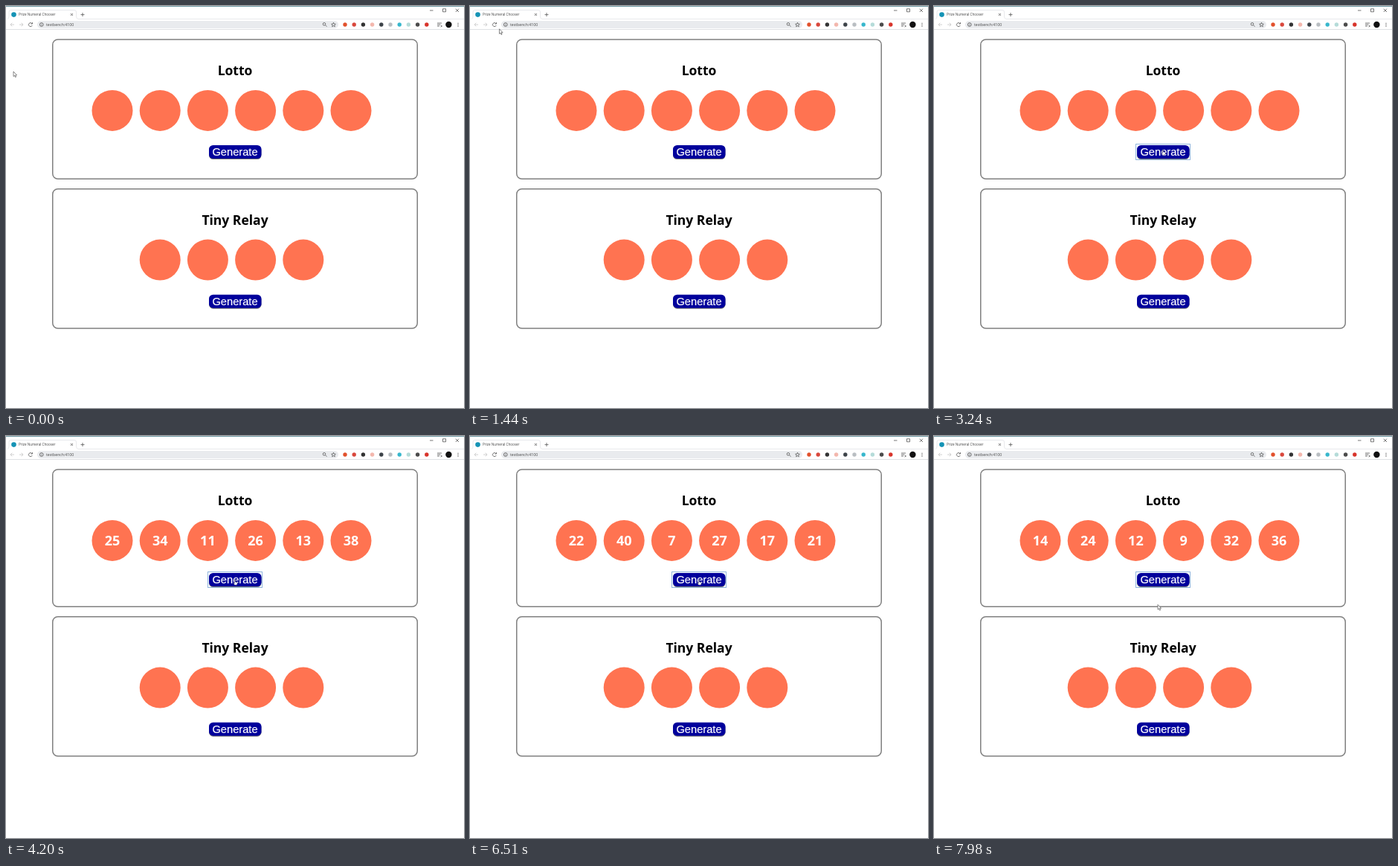
An HTML page that plays this animation: 616 px wide and 540 px high, repeating every 8000 ms.

```html
<!DOCTYPE html>
<html lang="en">
<head>
<meta charset="utf-8">
<title>Number generator</title>
<style>
  html, body { margin: 0; width: 100%; height: 100%; overflow: hidden; background: #fff; }
  svg { display: block; }
  text { font-family: "Open Sans", "Noto Sans", sans-serif; }
  .title { font-weight: 700; font-size: 17.5px; text-anchor: middle; }
  .number { font-weight: 700; font-size: 18px; text-anchor: middle; fill: #fff; }
  .label { font: 14.7px "Liberation Sans", Arial, sans-serif; text-anchor: middle;
           fill: #fff; stroke: #fff; stroke-width: .2; }
  .tiny { font-size: 4.6px; fill: #444; }
  .panel { fill: none; stroke: #808080; stroke-width: 1.5; }
  .ball { fill: #ff7351; }
  .button { fill: #00009c; filter: drop-shadow(.7px 1px .6px #777); }
  .line { fill: none; stroke: #555; stroke-width: .8; }
  .faint { stroke: #c4c4c4; }
</style>
</head>
<body>
<svg width="616" height="540" viewBox="0 0 616 540">
  <g id="browser">
    <path d="M0 .5H616" stroke="#6f9aa5"/>
    <path class="line" style="stroke:#e2e4e7" d="M2 17.5Q4 17 4 14V8Q4 5.5 6.5 5.5H92Q94.5 5.5 94.5 8V14Q94.5 17 97 17.5H616"/>
    <circle cx="10.5" cy="11.6" r="3.3" fill="#1593b5"/>
    <text class="tiny" x="17" y="13.3">Prize Numeral Chooser</text>
    <rect x="42" y="20" width="405" height="10" rx="5" fill="#e9ebee"/>
    <text class="tiny" x="54" y="26.9" style="font-size:5.2px">testbench:4100</text>
    <path d="M0 31.5H616" stroke="#dfe1e4"/>
    <!-- tab and window buttons -->
    <path class="line" d="M87 10l3 3m0-3l-3 3M100.5 11.6h5m-2.5-2.5v5M570 6h4.5M587.5 3.8h4v4h-4zM604.8 3.8L609 8m0-4.2L604.8 8"/>
    <!-- back, forward -->
    <path class="line faint" d="M11 25H6m2.3-2.3L6 25l2.3 2.3M18 25h5m-2.3-2.3L23 25l-2.3 2.3"/>
    <!-- reload, info, zoom, star, list -->
    <path class="line" d="M34.8 23.4A2.5 2.5 0 1 0 35.3 26m.2-4v2h-2M47.8 24.7v1.7m0-2.9v.5M429.5 25.7l2 2M580 23h6m-6 2h4m-4 2h3m1.5-1.5l2 1.5l-2 1"/>
    <circle class="line" cx="47.8" cy="25" r="2.4"/>
    <circle class="line" cx="428" cy="24.3" r="1.8"/>
    <path class="line" d="M440.5 22.2l.8 1.9 2.1.2-1.6 1.4.5 2-1.8-1.1-1.8 1.1.5-2-1.6-1.4 2.1-.2z"/>
    <g id="extensions"></g>
    <circle cx="595.4" cy="25" r="4.2" fill="#111"/>
    <path d="M608 22.7v5" stroke="#555" stroke-width="1.2" stroke-dasharray="1.1 .9"/>
  </g>
  <g id="lotto"></g>
  <g id="mini"></g>
  <g id="cursor" stroke="#555" stroke-width=".7" fill="#fff" stroke-linejoin="round">
    <path id="arrow" d="M0 0V6.6L1.5 5.3 2.5 7.7 3.6 7.2 2.6 4.9H4.6Z"/>
    <path id="hand" stroke="#226" stroke-width=".6"
      d="M-.6 0Q0-1 .6 0V3L2.8 3.6Q3.4 4 3.2 5L2.6 7.2H-.6L-2.2 4.6Q-1.8 3.8-.6 4.8Z"/>
  </g>
</svg>
<script>
const LOOP = 8000, FOCUS = 3180, SHIFT = 3270;
const PANEL_STEP = 200.7, LIFT = 3;
const el = id => document.getElementById(id);
const show = (id, on) => el(id).setAttribute("display", on ? "inline" : "none");
const times = (n, make) => Array.from({ length: n }, (_, i) => make(i)).join("");

// Each leg starts and ends at a time and leads to a point.
const legs = [
  { from: 30, to: 420, x: 8, y: 85 },
  { from: 420, to: 810, x: 10, y: 88 },
  { from: 1050, to: 1440, x: 39, y: 30.5 },
  { from: 1440, to: 2760, x: 308, y: 193 },
  { from: 7770, to: 7980, x: 301, y: 226.5 }
];
const draws = [
  { at: SHIFT, numbers: randomDraw(8) },
  { at: 3540, numbers: randomDraw(4) },
  { at: 3960, numbers: "25 34 11 26 13 38".split(" ") },
  { at: 5220, numbers: randomDraw(22) },
  { at: 6300, numbers: "22 40 7 27 17 21".split(" ") },
  { at: 7200, numbers: "14 24 12 9 32 36".split(" ") }
];

// Six different numbers from 1 to 40; the seed is the first one.
function randomDraw(seed) {
  return [0, 1, 2, 3, 4, 5].map(i => (seed + i * 17 - 1) % 40 + 1);
}

const extensionColors = ["#e2512c", "#d9473c", "#333", "#f3b7ad", "#3c4248",
  "#b9bec2", "#37b7cc", "#b5dcd9", "#4b4b4b", "#d8342b"];
el("extensions").innerHTML = extensionColors.map((color, i) =>
  `<circle cx="${456 + i * 12.2}" cy="25" r="2.7" fill="${color}"/>`).join("");

function panel(title, count, top, extra = "") {
  return `<rect class="panel" x="62.75" y="${top}" width="490.5" height="187.3" rx="7"/>
    <text class="title" x="308" y="${top + 48}">${title}</text>` +
    times(count, i => {
      const x = 303.5 + (i - (count - 1) / 2) * 64.2;
      return `<circle class="ball" cx="${x}" cy="${top + 95.4}" r="27.5"/>
        <text class="number" x="${x}" y="${top + 101.7}"></text>`;
    }) +
    `<g class="action">
      <rect class="button" x="273" y="${top + 142}" width="70.5" height="18" rx="5.5"/>
      <text class="label" x="308" y="${top + 156.2}">Generate</text>${extra}
    </g>`;
}

const ring = `<rect id="ring" x="271.5" y="185.5" width="73" height="21" fill="none" stroke="#8fb4dc"/>`;
el("lotto").innerHTML = panel("Lotto", 6, 45, ring);
el("mini").innerHTML = panel("Tiny Relay", 4, 45 + PANEL_STEP);
const frame = document.querySelector("#lotto .panel");
const action = document.querySelector("#lotto .action");
const numbers = document.querySelectorAll("#lotto .number");

function position(t) {
  let x = 10, y = 88;
  for (const leg of legs) {
    const u = Math.min(1, Math.max(0, (t - leg.from) / (leg.to - leg.from)));
    const k = 1 - (1 - u) ** 2.3;
    x += (leg.x - x) * k;
    y += (leg.y - y) * k;
  }
  return [x, y];
}

function render() {
  const t = performance.now() % LOOP;
  const lift = t >= SHIFT ? LIFT : 0;
  for (const part of [action, el("mini")]) part.setAttribute("transform", `translate(0 ${-lift})`);
  frame.setAttribute("height", 187.3 - lift);
  show("ring", t >= FOCUS);

  const draw = draws.filter(d => d.at <= t).pop();
  numbers.forEach((n, i) => n.textContent = draw ? draw.numbers[i] : "");

  const [x, y] = position(t);
  const over = x > 273 && x < 344 && y > 187 - lift && y < 205 - lift;
  show("hand", over);
  show("arrow", !over);
  el("cursor").setAttribute("transform", `translate(${x} ${y})`);
  requestAnimationFrame(render);
}
render();
</script>
</body>
</html>
```
